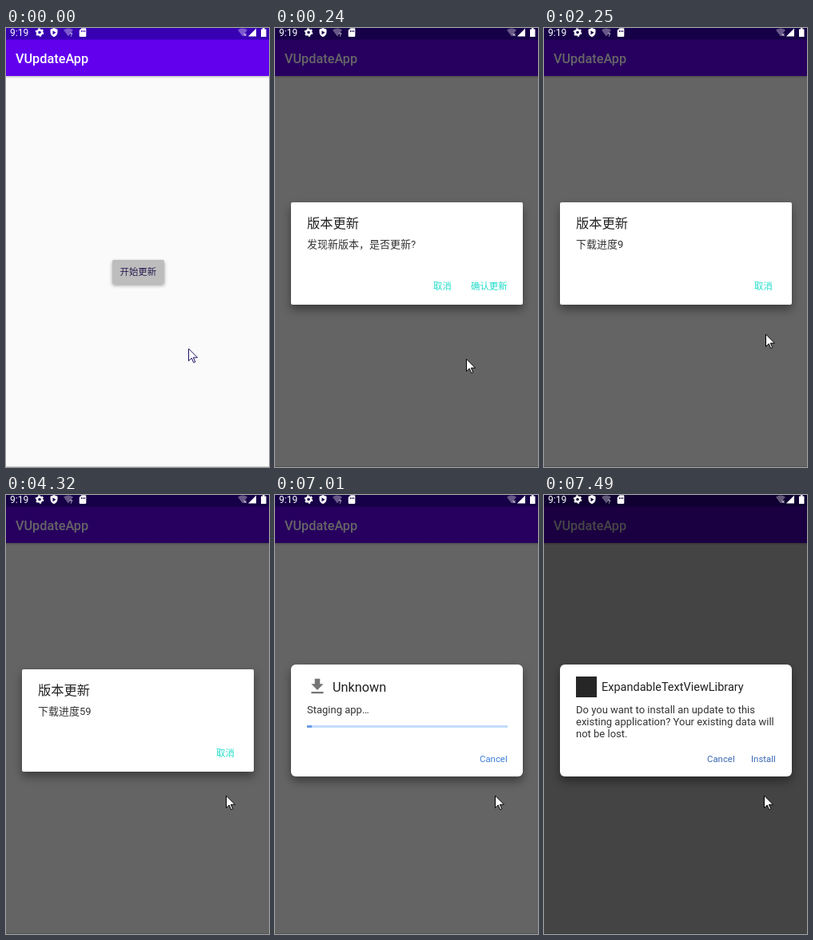
Write an HTML page that moves like this. It is 329 by 549 pixels and loops after 7.56 s.

```html
<!DOCTYPE html>
<html lang="zh-CN">
<head>
<meta charset="utf-8">
<style>
  html, body { margin: 0; width: 100%; height: 100%; overflow: hidden; background: #fafafa; }
  svg { display: block; width: 329px; height: 549px; font: 13px Roboto, "Noto Sans CJK SC", "Noto Sans CJK", sans-serif; }
  .title { font-size: 16.25px; fill: #212121; }
  .body { fill: #333; }
  .action { font-size: 11.4px; }
  .teal { fill: #1fdcc9; }
  .card { fill: #fff; filter: drop-shadow(0 6px 6px rgba(0, 0, 0, .4)); }
</style>
</head>
<body>
<svg viewBox="0 0 329 549">
  <defs>
    <linearGradient id="fall" x2="0" y2="1">
      <stop stop-opacity=".22"/><stop offset="1" stop-opacity="0"/>
    </linearGradient>
  </defs>

  <!-- app screen -->
  <rect width="329" height="549" fill="#fafafa"/>
  <rect y="60" width="329" height="3" fill="url(#fall)"/>
  <rect y="14" width="329" height="46" fill="#6200ee"/>
  <rect width="329" height="14.5" fill="#3700b3"/>
  <text x="12" y="44" font-size="16.25" font-weight="500" fill="#fff">VUpdateApp</text>
  <rect x="133" y="290" width="65" height="30" rx="2" fill="#bdbdbd" style="filter:drop-shadow(0 2px 2px rgba(0,0,0,.35))"/>
  <text class="action" x="142.5" y="309" fill="#2a1c50">开始更新</text>
  <rect y="548" width="329" height="1" fill="#cfcfcf"/>
  <rect id="dim" width="329" height="549"/>

  <!-- status bar -->
  <g fill="#fff">
    <text x="5" y="10" font-size="12">9:19</text>
    <circle cx="42" cy="5.5" r="3" fill="none" stroke="#fff" stroke-width="2.4"/>
    <circle cx="42" cy="5.5" r="4.6" fill="none" stroke="#fff" stroke-width="1.4" stroke-dasharray="2.4 2.417"/>
    <path fill-rule="evenodd" d="M60 0l4.5 1.8v3.4c0 3-2 5-4.5 6.1-2.5-1.1-4.5-3.1-4.5-6.1V1.800zM58.500 3.200v5l4-2.500z"/>
    <path d="M72 2.500q6-4 12 0l-6 8z" opacity=".35"/>
    <text x="79.500" y="10.500" font-size="8">?</text>
    <path fill-rule="evenodd" d="M94.500.300h5q.8 0 .8.800v9q0 .8-.8.8h-7q-.8 0-.8-.8v-7zM94 3v2h1V3zm2 0v2h1V3zm2 0v2h1V3z"/>
    <path d="M290 2.500q6-4 12 0l-6 8z" opacity=".35"/>
    <path d="M297.500 7l3 3m0-3l-3 3" stroke="#fff"/>
    <path d="M303 10.500L313 .500v10z"/>
    <path d="M319 1.500h2v-1.500h2.500v1.500h2v9.500h-6.500z"/>
  </g>

  <!-- update dialog -->
  <g id="update">
    <rect class="card" x="20" y="218" width="290" height="128" rx="2"/>
    <text class="title" x="40" y="250">版本更新</text>
    <text class="body" id="message" x="40" y="275"></text>
    <rect id="press" x="237" y="308" width="60" height="29" rx="2" fill="#03dac5" opacity=".18"/>
    <text class="action teal" id="cancel" y="327">取消</text>
    <text class="action teal" id="confirm" x="245" y="327">确认更新</text>
  </g>

  <!-- installer dialogs -->
  <g id="installer">
    <rect class="card" x="20" y="212" width="290" height="140" rx="6"/>
    <g id="staging">
      <path transform="translate(40 226.600) scale(1.083)" fill="#757575" d="M19 9h-4V3H9v6H5l7 7 7-7zM5 18v2h14v-2z"/>
      <text class="title" x="72" y="245.500">Unknown</text>
      <text class="body" x="40" y="272.500">Staging app…</text>
      <rect x="40" y="288" width="251" height="3" fill="#c3dcfa"/>
      <rect id="tail" x="40" y="288" height="3" fill="#d6dce8"/>
      <rect id="bar" y="288" height="3"/>
      <text class="action" x="256" y="333.500" fill="#3b7fdc">Cancel</text>
    </g>
    <g id="ask">
      <rect x="40" y="227" width="26" height="26" fill="#262626"/>
      <text x="72" y="245" font-size="14.500" fill="#212121">ExpandableTextViewLibrary</text>
      <text class="body">
        <tspan x="40" y="273">Do you want to install an update to this</tspan>
        <tspan x="40" y="288">existing application? Your existing data will</tspan>
        <tspan x="40" y="303">not be lost.</tspan>
      </text>
      <g class="action" fill="#3a69b4">
        <text x="204" y="333.500">Cancel</text>
        <text x="259" y="333.500">Install</text>
      </g>
    </g>
  </g>

  <path id="cursor" fill="#fff" stroke="#000" d="M.5 1V16.300l3.700-3.500 2.500 5.700 2.100-.9-2.500-5.500h5.200z"/>
</svg>
<script>
const LOOP = 7560, STEP = 1000 / 13;
const el = id => document.getElementById(id);
const set = (id, attrs) => { for (const a in attrs) el(id).setAttribute(a, attrs[a]); };
const show = (id, on) => { el(id).style.display = on ? '' : 'none'; };

// Linear interpolation through [step, value...] keys; column picks the value.
function track(keys, k, column = 1) {
  const i = keys.findIndex(key => key[0] >= k);
  if (i < 0) return keys[keys.length - 1][column];
  if (i === 0) return keys[0][column];
  const a = keys[i - 1], b = keys[i];
  return a[column] + (b[column] - a[column]) * (k - a[0]) / (b[0] - a[0]);
}

const pointer = [[-1, 228, 400], [2, 239, 413], [4, 239, 413], [8, 284, 329], [12, 284, 329],
  [17, 277, 410], [22, 277, 410], [23, 277, 396], [25, 277, 394], [28, 277, 382],
  [30, 275, 382], [34, 275, 382], [35, 275, 379], [37, 275, 379], [39, 275, 375]];
const shade = [[-1, 0], [0, .15], [1, .42], [2, .6], [90, .6], [93, .68], [96, .724]];
const progress = [[25, 0], [28, 9], [33, 20], [37, 20], [38, 22], [55, 59], [88, 100]];
const segment = [[90, 40, 46], [93, 51, 110], [95, 74, 165]];
const entry = [[-1, 0], [0, .35], [1, .8], [2, 1]];

function draw(t) {
  const k = Math.floor((t - 80) / STEP);
  const dialog = track(entry, k), scale = .9 + .1 * dialog;
  set('dim', { opacity: track(shade, k) });
  show('update', k >= 0 && k < 90);
  set('update', { opacity: dialog, transform: `translate(165 282) scale(${scale}) translate(-165 -282)` });
  el('message').textContent = k < 25 ? '发现新版本，是否更新?' : '下载进度' + Math.round(track(progress, k));
  show('press', k === 10 || k === 11);
  show('confirm', k < 12);
  set('cancel', { x: k < 12 ? 198 : 263 });

  show('installer', k >= 90);
  show('staging', k < 95);
  show('ask', k >= 95);
  const left = track(segment, k), right = track(segment, k, 2);
  set('tail', { width: left - 40 });
  set('bar', { x: left, width: right - left, fill: k < 92 ? '#6a9ce6' : '#4a7ccb' });

  const x = Math.round(track(pointer, k)), y = Math.round(track(pointer, k, 2));
  set('cursor', { transform: `translate(${x} ${y})`, stroke: k < 0 ? '#1a1060' : '#000' });
}

const start = performance.now();
function frame() {
  draw((performance.now() - start) % LOOP);
  requestAnimationFrame(frame);
}
frame();
</script>
</body>
</html>
```
